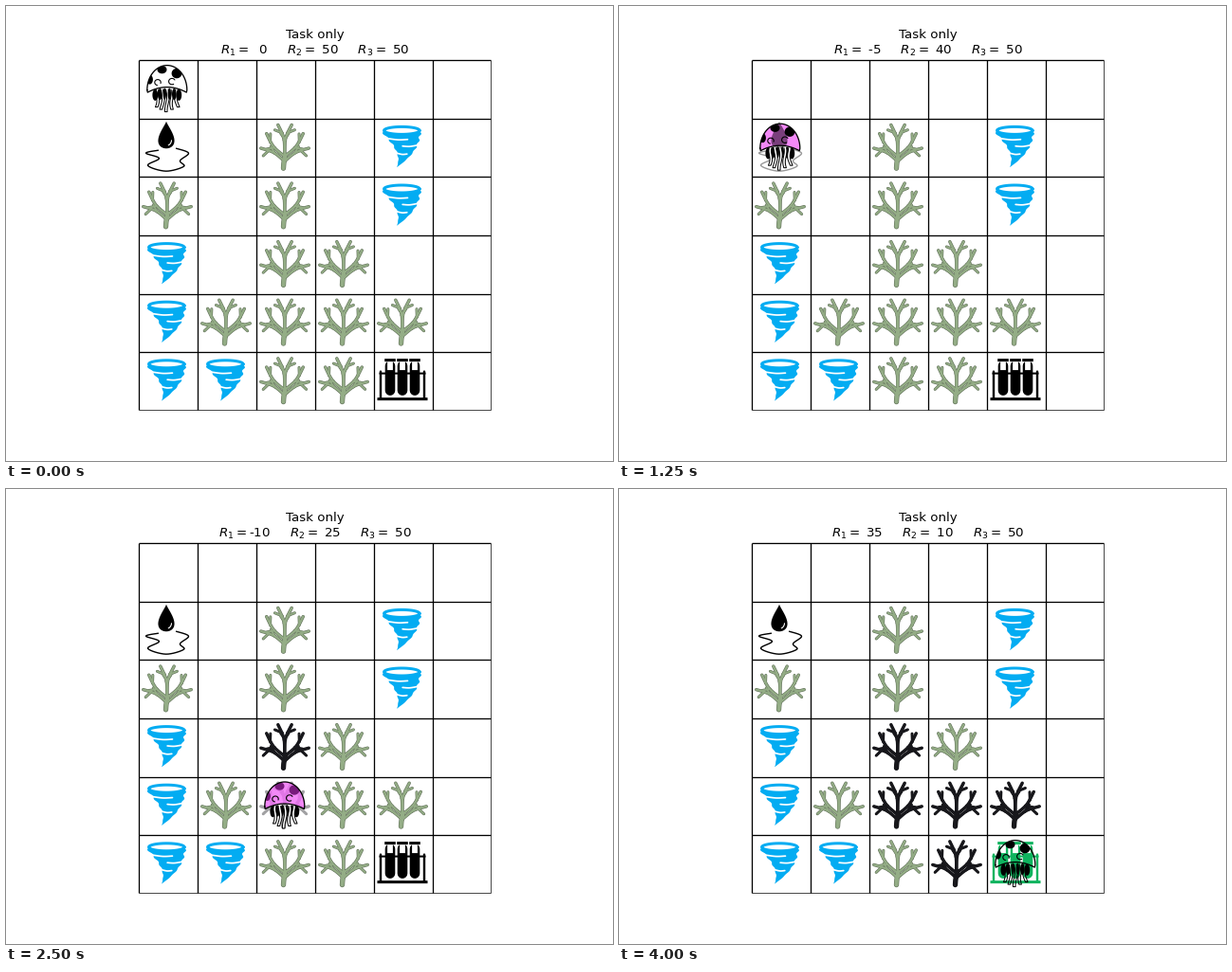
A matplotlib script for the animation above (4250 ms loop, 640 px wide and 480 px high).

```python
import numpy as np
import matplotlib.pyplot as plt
from matplotlib.animation import FuncAnimation
from matplotlib.patches import PathPatch
from matplotlib.path import Path
from matplotlib.transforms import Affine2D

W, H, DPI = 640, 480, 80
PX = 72 / DPI
LEFT, TOP, CW, CH = 140.5, 57.6, 62, 61.6

# o: oil, c: coral, s: storm, l: lab
FIELD = ["......",
         "o.c.s.",
         "c.c.s.",
         "s.cc..",
         "scccc.",
         "ssccl."]
N = len(FIELD)
CORALS = {(c, r) for r in range(N) for c in range(N) if FIELD[r][c] == "c"}

STEP = {"D": (0, 1), "U": (0, -1), "R": (1, 0), "L": (-1, 0), ".": (0, 0)}
MOVES = "D.RL.RDDRDRDURD."
ROUTE = [(0, 0)]
for m in MOVES:
    ROUTE.append((ROUTE[-1][0] + STEP[m][0], ROUTE[-1][1] + STEP[m][1]))
SPILLS = (3, 5, 6)
PICKUP, LAST = 2, len(MOVES)

BLACK, BLUE, GREEN = "#000000", "#03acf2", "#10b45f"
PINK, PLUM = "#f06cf6", "#781a7c"

fig = plt.figure(figsize=(W / DPI, H / DPI), dpi=DPI, facecolor="white")
ax = fig.add_axes([0, 0, 1, 1])


def curve(x, y):
    return Path(np.column_stack(np.broadcast_arrays(x, y)))


def line(x0, y0, x1, y1):
    return Path([(x0, y0), (x1, y1)])


def ellipse(x, y, rx, ry, a0=0, a1=360):
    t = np.radians(np.linspace(a0, a1, 40))
    return curve(x + rx * np.cos(t), y + ry * np.sin(t))


def rect(x0, y0, x1, y1):
    return Path([(x0, y0), (x1, y0), (x1, y1), (x0, y1), (x0, y0)])


def smooth(pts, n=8):
    """Catmull-Rom curve through the points."""
    p = np.array(pts, float)
    p = np.vstack([p[0], p, p[-1]])
    t = np.linspace(0, 1, n, endpoint=False)[:, None]
    parts = [b + t * (c - a) / 2 + t**2 * (2 * a - 5 * b + 4 * c - d) / 2
             + t**3 * (3 * b - a - 3 * c + d) / 2
             for a, b, c, d in zip(p, p[1:], p[2:], p[3:])]
    return Path(np.vstack(parts + [p[-1:]]))


def draw(path, at, fc="none", ec="none", lw=0.0, alpha=None, clip=None, cap="round"):
    tr = Affine2D().translate(*at) + ax.transData
    patch = PathPatch(path, fc=fc, ec=ec, lw=lw * PX, alpha=alpha, transform=tr,
                      capstyle=cap, joinstyle="round", snap=False)
    ax.add_patch(patch)
    if clip is not None:
        patch.set_clip_path(clip, tr)


def origin(cell):
    return LEFT + cell[0] * CW, TOP + cell[1] * CH


def grow_coral():
    """Trunk, a fan of bent limbs, and twigs on alternating sides."""
    parts = [(4.6, smooth([(28, 52), (28.5, 46), (30, 38)]))]
    for k, a in enumerate(np.radians(np.linspace(-82, 82, 6))):
        root = np.array([29.2, 46 - 10 * np.cos(a)])
        tip = np.array([29.5 + 25.5 * np.sin(a), 35 - 30 * np.cos(a)])
        side = (-1) ** k
        d = tip - root
        normal = np.array([-d[1], d[0]])
        mid = root + 0.5 * d + 0.09 * side * normal
        parts.append((2.7, smooth([root, mid, tip])))
        for j, s in enumerate((0.45, 0.7)):
            base = root + s * d + 0.08 * side * normal
            turn = a + side * (-1) ** j * 0.9
            end = base + 8.5 * np.array([np.sin(turn), -np.cos(turn)])
            parts.append((2.3, Path([base, end])))
    return parts


CORAL = grow_coral()


def coral(at, dead):
    edge, fill = ("#101014", "#18181c") if dead else ("#62725a", "#94ad86")
    for w, p in CORAL:
        draw(p, at, ec=edge, lw=w + 0.7)
    for w, p in CORAL:
        draw(p, at, ec=fill, lw=w - 0.5)


def funnel_edge(t, side):
    """Left (-1) or right (+1) edge of the funnel at depth t."""
    mid = 28.5 + 4.5 * np.sin(np.pi * t) - 5 * t**4
    half = 20 * (1 - t) + 1.3 * np.sin(10 * np.pi * t) * (1 - t)
    return mid + side * half, 14 + 37 * t - 2 * side * t * (1 - t)


def storm(at):
    t = np.linspace(0, 1, 50)
    left, right = funnel_edge(t, -1), funnel_edge(t, 1)
    draw(curve(np.r_[left[0], right[0][::-1]], np.r_[left[1], right[1][::-1]]), at, BLUE)
    for k, depth in enumerate((0.17, 0.38, 0.58)):
        side = 1 if k % 2 else -1
        x, y = funnel_edge(depth, side)
        reach = 24 * (1 - depth)
        draw(smooth([(x + side, y), (x - side * reach / 2, y + 1.4),
                     (x - side * reach, y + 1)]), at, ec="white", lw=1.7)
    draw(ellipse(28.8, 12.2, 18.8, 4), at, "white", BLUE, 3)


t = np.linspace(0, 2 * np.pi, 50)
DROP = curve(28.5 + 12.2 * np.sin(t) * np.sin(t / 2) ** 1.5, 16.8 - 14.3 * np.cos(t))
POOL = smooth([(20, 33), (7, 36), (21, 41.5), (9, 49), (28, 55), (47, 50),
               (43, 44), (52, 36), (39, 31)])


def oil(at):
    draw(POOL, at, ec=BLACK, lw=1.4)
    draw(DROP, at, BLACK)
    draw(ellipse(29, 22, 5, 6, 5, 70), at, ec="white", lw=1.1)


def lab(at, color):
    draw(rect(3, 47.5, 56, 50.5), at, color)
    draw(rect(5, 21, 54, 23), at, color)
    for x in (6.5, 52.5):
        draw(line(x, 20, x, 49), at, ec=color, lw=2.4)
    for x in (16.5, 29.5, 42.5):
        draw(line(x, 14, x, 40), at, ec=color, lw=10.6)
        draw(rect(x - 5.8, 6.5, x + 5.8, 9.5), at, color)
        draw(rect(x - 2.9, 9.5, x + 2.9, 18.5), at, "white")


arc = ellipse(29.3, 31, 21, 26, 180, 360).vertices
u = np.linspace(1, -1, 30)
hem = np.column_stack([29.3 + 20.5 * u, 28 + 5.5 * u**2])
DOME = Path(np.vstack([arc, hem, arc[:1]]))
SPOTS = [ellipse(24, 9.5, 5, 4.2), ellipse(39.5, 13.5, 5.4, 5.2),
         ellipse(11, 20, 3.4, 5)]
RINGS = [ellipse(19.5, 23, 3.2, 3, 100, 380), ellipse(34.5, 22, 3.4, 3.2, 60, 330)]


def jelly(at, spot=BLACK, body=None):
    if body:
        draw(DOME, at, body, alpha=0.8)
    for s in SPOTS:
        draw(s, at, spot, clip=DOME)
    for r in RINGS:
        draw(r, at, ec=BLACK, lw=1.1)
    # dark lobes with tentacles between them
    for k in np.arange(6) - 2.5:
        draw(ellipse(29.3 + 5 * k, 35 + 0.2 * k**2, 1.4 + 0.6 * abs(k), 6), at, BLACK)
    s = np.linspace(0, 1, 20)
    for k in np.arange(5) - 2:
        x = 29.3 + k * (4.6 + s) + 1.1 * np.sin(5 * s + k)
        y = 30.5 + (23.5 - 2.5 * abs(k)) * s
        draw(curve(np.r_[x - 1.3, x[::-1] + 1.3], np.r_[y, y[::-1]]), at,
             "white" if body else "none", BLACK, 1.0)
    draw(DOME, at, ec=BLACK, lw=1.3)


def grid():
    right, bottom = LEFT + N * CW - 1, np.floor(TOP + N * CH) - 0.5
    for k in range(N + 1):
        x = min(LEFT + k * CW, right)
        y = min(np.floor(TOP + k * CH) + 0.5, bottom)
        lw = 0.7 if k == N else 1.3
        draw(line(x, TOP, x, bottom), (0, 0), ec=BLACK, lw=lw, cap="butt")
        draw(line(LEFT, y, right, y), (0, 0), ec=BLACK, lw=lw, cap="butt")


def title(y, text):
    ax.text(326, y, text, size=12, family="DejaVu Sans", ha="center", va="baseline")


def update(i):
    ax.clear()
    ax.set_xlim(0, W)
    ax.set_ylim(H, 0)
    ax.axis("off")

    done = i == LAST
    hit = CORALS & set(ROUTE[:i + 1])
    for r, row in enumerate(FIELD):
        for c, kind in enumerate(row):
            at = origin((c, r))
            if kind == "c":
                coral(at, (c, r) in hit)
            elif kind == "s":
                storm(at)
            elif kind == "o":
                oil(at)
            elif kind == "l":
                lab(at, GREEN if done else BLACK)

    col, row = ROUTE[i]
    at = origin((col, row))
    if PICKUP <= i < LAST:
        on_oil = FIELD[row][col] == "o"
        draw(rect(0, 0, CW, CH), at, "white", alpha=0.6)
        jelly(at, BLACK if on_oil else PLUM, PINK)
        if on_oil:
            draw(DROP, at, BLACK, alpha=0.45, clip=DOME)
    else:
        jelly(at)
    grid()

    r1 = 35 if done else -i
    r2 = 50 - 5 * (len(hit) + sum(s <= i for s in SPILLS))
    title(34, "Task only")
    title(51, "     ".join(f"$R_{n}=${v:3d}" for n, v in enumerate((r1, r2, 50), 1)))
    return []


anim = FuncAnimation(fig, update, frames=LAST + 1, init_func=lambda: [],
                     interval=250, repeat=True, repeat_delay=0, blit=False)
plt.show()
```
